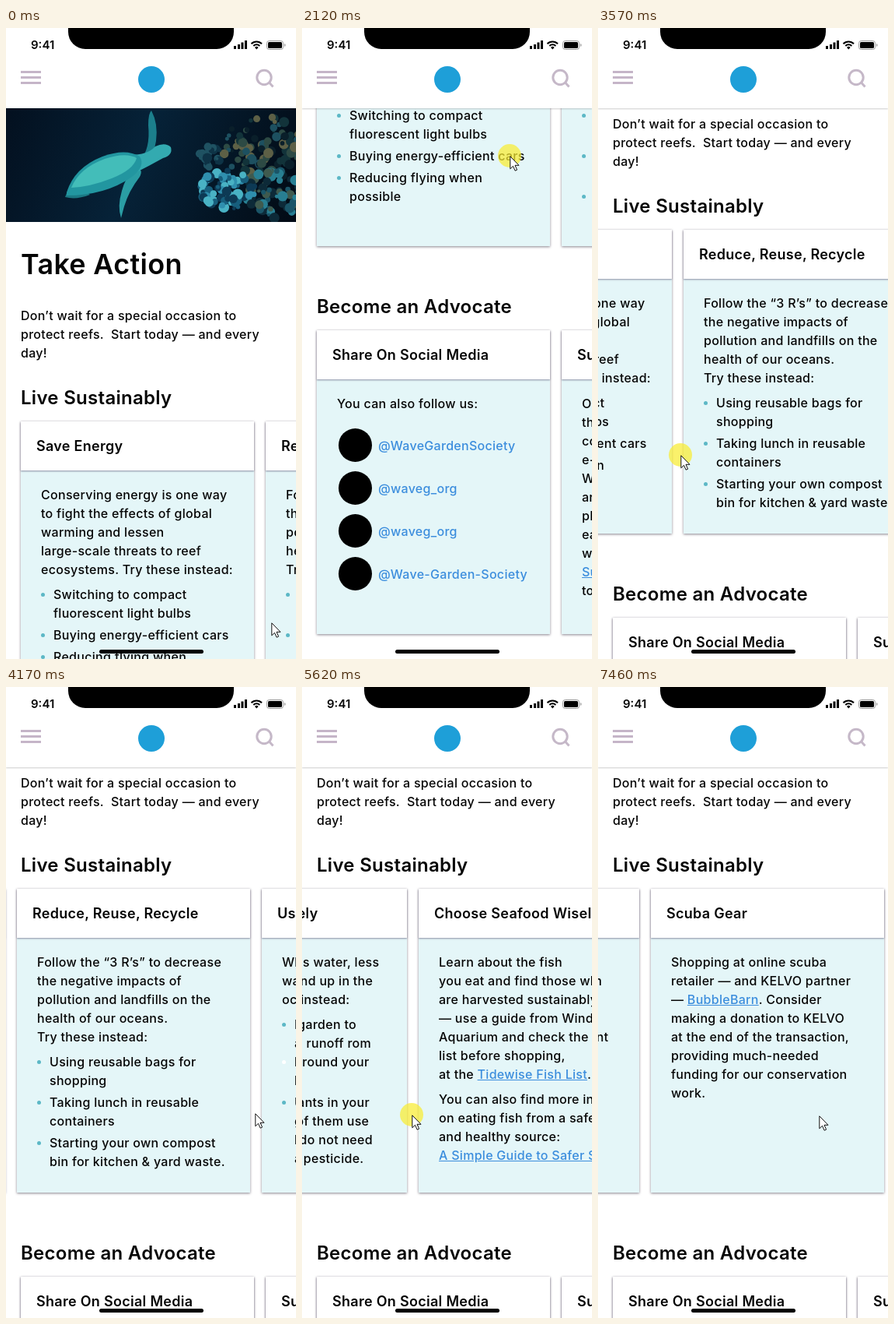
An HTML page with a canvas for the animation above (7.78 s loop, 373 px wide and 810 px high).

```html
<!DOCTYPE html>
<html lang="en">
<head>
<meta charset="utf-8">
<title>Take Action</title>
<style>
  html, body { margin: 0; width: 100%; height: 100%; overflow: hidden; background: #fff; }
  #stage {
    position: relative; width: 373px; height: 810px; overflow: hidden; background: #fff; color: #050505;
    font: 500 16px/24px Inter, "Open Sans", sans-serif; letter-spacing: .018em; white-space: pre;
  }
  #stage div, #stage svg, #stage canvas { position: absolute; }
  #page, #row1, #row2 { left: 0; top: 0; }
  h1, h2, h3, p, ul { position: absolute; margin: 0; padding: 0; left: 19px; }
  h1 { top: 281px; font: 600 36px/44px Inter, sans-serif; }
  h2 { font: 600 24px/30px Inter, sans-serif; }
  .card { width: 300px; height: 390px; background: #e4f6f8; box-shadow: 0 1px 3px rgba(40, 30, 50, .55); }
  h3 {
    left: 0; top: 0; width: 280px; height: 63px; padding-left: 20px; background: #fff;
    font: 600 18px/63px Inter, sans-serif; box-shadow: 0 1px 2px rgba(50, 40, 80, .5);
  }
  .copy { left: 26px; top: 82px; }
  .copy p, .copy ul { position: static; }
  .copy p + p, .copy ul { margin-top: 8px; }
  li { list-style: none; position: relative; padding-left: 16px; margin-bottom: 4px; }
  li::before, .faint::after {
    content: ""; position: absolute; left: 0; top: 10px; width: 5px; height: 5px;
    border-radius: 50%; background: #5cb8c6;
  }
  .faint::after { top: 58px; background: #fff; }
  u, .handle { color: #3b8ddd; }
  .disc { left: 28px; width: 43px; height: 43px; border-radius: 50%; background: #000; }
  .handle { left: 79px; }
  #bar { left: 0; top: 0; width: 373px; height: 103px; background: #fff; box-shadow: 0 1px 2px rgba(0, 0, 0, .2); }
  #notch { left: 80px; top: 0; width: 213px; height: 27px; background: #000; border-radius: 0 0 22px 22px; }
  #clock { left: 32px; top: 10px; font: 600 15px/24px Inter, sans-serif; letter-spacing: 0; }
  #home { left: 120px; top: 798px; width: 134px; height: 5px; border-radius: 3px; background: #000; }
  #press { left: -16px; top: -16px; width: 30px; height: 30px; border-radius: 50%; background: rgba(248, 236, 50, .72); }
  #cursor { left: 0; top: 0; }
</style>
</head>
<body>
<div id="stage">
  <div id="page">
    <canvas id="photo" width="373" height="146" style="left:0;top:103px"></canvas>
    <h1>Take Action</h1>
    <p style="top:357px">Don’t wait for a special occasion to
protect reefs.  Start today — and every
day!</p>
    <h2 style="top:460px">Live Sustainably</h2>
    <div id="row1"></div>
    <h2 style="top:958px">Become an Advocate</h2>
    <div id="row2"></div>
  </div>
  <div id="bar">
    <div id="notch"></div>
    <div id="clock">9:41</div>
    <svg width="373" height="103" style="left:0;top:0">
      <path d="M293 23h3v4h-3zM298 21h3v6h-3zM302.500 18.500h3v8.500h-3zM307 16h3v11h-3z"/>
      <g fill="none" stroke="#000" stroke-width="2">
        <path d="M315.500 20.200a9.500 9.500 0 0 1 13.500 0M318.300 23a5.500 5.500 0 0 1 8 0"/>
      </g>
      <path d="M322.300 27.500l-2.300-2.600a3.300 3.300 0 0 1 4.600 0z"/>
      <rect x="335.500" y="16.500" width="21" height="11" rx="3" fill="none" stroke="#999"/>
      <rect x="337" y="18" width="18" height="8" rx="1.600"/>
      <path d="M358 20v4q1.500-.7 1.500-2t-1.500-2z" fill="#999"/>
      <path d="M19 56.500h26M19 63.500h26M19 70.500h26" stroke="#c5b5c8" stroke-width="3"/>
      <circle cx="187" cy="66" r="17" fill="#1e9fd8"/>
      <g fill="none" stroke="#c5b8c8" stroke-width="3">
        <circle cx="332" cy="63.500" r="9.200"/><path d="M338.500 70l5 5.500"/>
      </g>
    </svg>
  </div>
  <div id="home"></div>
  <div id="cursor">
    <div id="press"></div>
    <svg width="14" height="21" style="left:-1px;top:-1px">
      <path d="M.8.800v16l3.700-3.500 2.600 5.900 2.500-1.100-2.600-5.800h5z" fill="#fff" stroke="#111"/>
    </svg>
  </div>
</div>
<script>
const $ = id => document.getElementById(id);
const para = s => `<p>${s}</p>`;
const list = (...items) => `<ul>${items.map(s => s.startsWith('*')
  ? `<li class="faint">${s.slice(1)}</li>` : `<li>${s}</li>`).join('')}</ul>`;

const tips = [
  ['Save Energy',
    para('Conserving energy is one way\nto fight the effects of global\nwarming and lessen\nlarge-scale threats to reef\necosystems. Try these instead:') +
    list('Switching to compact\nfluorescent light bulbs', 'Buying energy-efficient cars', 'Reducing flying when\npossible')],
  ['Reduce, Reuse, Recycle',
    para('Follow the “3 R’s” to decrease\nthe negative impacts of\npollution and landfills on the\nhealth of our oceans.\nTry these instead:') +
    list('Using reusable bags for\nshopping', 'Taking lunch in reusable\ncontainers', 'Starting your own compost\nbin for kitchen &amp; yard waste.')],
  ['User Water Wisely',
    para('When you use less water, less\nwastewater will end up in the\nocean. Try these instead:') +
    list('*Planting a rain garden to\nabsorb polluted runoff rom\nhard surfaces around your\nhome',
      'Using native plants in your\ngarden—most of them use\nless water and do not need\nany fertilizer or pesticide.')],
  ['Choose Seafood Wisely',
    para('Learn about the fish\nyou eat and find those which\nare harvested sustainably\n— use a guide from Windley Bay\nAquarium and check the catch\nlist before shopping,\nat the <u>Tidewise Fish List</u>.') +
    para('You can also find more info\non eating fish from a safe\nand healthy source:\n<u>A Simple Guide to Safer Seafood</u>')],
  ['Ocean Is Already A Gift',
    para('Don’t buy pearl jewelry or\nhousehold goods made from\nmarine life—that includes\nshells! Harvesting these\nspecies can cause significant\nhabitat destruction or\ndramatically reduce\npopulations.')],
  ['Scuba Gear',
    para('Shopping at online scuba\nretailer — and KELVO partner\n— <u>BubbleBarn</u>. Consider\nmaking a donation to KELVO\nat the end of the transaction,\nproviding much-needed\nfunding for our conservation\nwork.')]
];

const handles = ['@WaveGardenSociety', '@waveg_org', '@waveg_org', '@Wave-Garden-Society'];
const social = handles.map((name, i) =>
  `<div class="disc" style="top:${126 + i * 55}px"></div><div class="handle" style="top:${136 + i * 55}px">${name}</div>`).join('');
const advocate = [
  ['Share On Social Media', para('You can also follow us:'), social],
  ['Support Our Work', para('Our members keep\nthe reefs alive and\ncolonies safe. Our\ne-news shares it.\nWe send stories that\nare easy to read and\nplans for helping in\neach season, along\nwith local events.\n<u>Support us</u> today\nto learn more.')]
];

function fillRow(id, top, cards) {
  $(id).innerHTML = cards.map(([title, copy, extra = ''], i) =>
    `<div class="card" style="left:${19 + i * 315}px;top:${top}px"><h3>${title}</h3><div class="copy">${copy}</div>${extra}</div>`).join('');
}
fillRow('row1', 505, tips);
fillRow('row2', 1003, advocate);

function paintPhoto() {
  const c = $('photo').getContext('2d');
  const water = c.createLinearGradient(0, 0, 373, 146);
  water.addColorStop(0, '#03101f');
  water.addColorStop(.45, '#062238');
  water.addColorStop(1, '#020a14');
  c.fillStyle = water;
  c.fillRect(0, 0, 373, 146);

  let seed = 11;
  const rnd = () => (seed = seed * 16807 % 2147483647) / 2147483647;
  const cluster = (n, x, y, w, h, colors) => {
    for (let i = 0; i < n; i++) {
      const a = rnd() * 6.283, d = Math.sqrt(rnd());
      c.fillStyle = colors[i % colors.length];
      c.beginPath();
      c.arc(x + Math.cos(a) * d * w, y + Math.sin(a) * d * h, 2 + rnd() * 5, 0, 6.3);
      c.fill();
    }
  };
  cluster(90, 330, 52, 50, 42, ['#12333a', '#2d4a44', '#5d6046', '#1d5060', '#0a1f2a']);
  cluster(70, 345, 112, 42, 32, ['#0d2a38', '#1a5568', '#3f5a4e', '#287f92']);
  cluster(75, 285, 105, 36, 26, ['#175e7c', '#2f8fae', '#49b2c4', '#0d3a55']);
  cluster(25, 262, 62, 18, 16, ['#0e3346', '#1f5262']);

  const shape = (color, d) => { c.fillStyle = color; c.fill(new Path2D(d)); };
  shape('#1c7f8c', 'M172 68Q186 52 183 22Q183 6 187 3Q196 20 193 42Q190 62 180 74Z');
  shape('#2a9da4', 'M164 78Q178 76 172 88Q158 106 152 126L148 141Q143 126 149 106Q154 88 164 78Z');
  shape('#1b7984', 'M92 100Q78 104 76 114Q90 118 108 111Z');
  shape('#33aab0', 'M160 60Q182 60 192 49Q205 43 212 50Q215 60 202 64Q184 74 168 82Z');
  shape('#2296a0', 'M78 108Q88 76 124 62Q154 51 172 62Q180 74 162 88Q128 112 78 112Z');
  shape('#43bdb9', 'M84 102Q94 77 127 65Q154 56 168 64Q164 79 136 90Q108 101 84 102Z');
}
paintPhoto();

const ease = {
  l: u => u,
  i: u => u * u,
  o: u => 1 - (1 - u) ** 2,
  s: u => u * u * (3 - 2 * u)
};

// Each key: time, one or more values, optional ease into that key.
function at(keys, t) {
  const num = k => k.filter(v => typeof v === 'number').slice(1);
  const n = keys.findIndex(k => k[0] > t);
  if (n === 0) return num(keys[0]);
  if (n < 0) return num(keys[keys.length - 1]);
  const a = keys[n - 1], b = keys[n], last = b[b.length - 1];
  const u = (ease[last] || ease.s)((t - a[0]) / (b[0] - a[0]));
  const to = num(b);
  return num(a).map((v, i) => v + (to[i] - v) * u);
}

const pointer = [
  [70, 342, 764], [520, 330, 309], [830, 281, 640], [880, 281, 640],
  [1127, 273, 468, 'i'], [1430, 268, 157, 'o'], [2050, 268, 157], [2880, 287, 523],
  [2960, 288, 533, 'l'], [3250, 325, 549], [3330, 325, 549], [3650, 70, 549],
  [3750, 65, 549], [4180, 321, 548], [4400, 332, 549], [4500, 332, 549],
  [4820, 175, 550, 'i'], [4863, 168, 550, 'l'], [5000, 158, 550, 'o'], [5160, 158, 550],
  [5400, 330, 550], [5750, 60, 550], [5990, 325, 550], [6040, 325, 550],
  [6270, 40, 549], [6303, 30, 549, 'l'], [6400, 22, 549, 'o'], [6760, 22, 549],
  [6930, 320, 550], [7180, 70, 551], [7460, 285, 551]
];
const scrollY = [
  [70, 0], [520, 455], [840, 560, 'o'], [880, 562], [1050, 623],
  [2050, 623], [2880, 256], [2960, 246, 'l']
];
const scrollX = [
  [3330, 0], [3650, 262], [4180, 320, 'o'], [4420, 335, 'o'], [4500, 335],
  [4820, 525, 'i'], [4863, 570, 'l'], [5020, 640, 'o'], [5400, 640],
  [5750, 890], [6000, 950, 'o'], [6040, 950], [6270, 1140, 'i'],
  [6303, 1179, 'l'], [6530, 1262, 'o'], [6930, 1262], [7180, 1505], [7400, 1526, 'o']
];
const presses = [[100, 520], [890, 1430], [1810, 2960], [3330, 3650], [4500, 4820], [5400, 5750], [6040, 6270], [6930, 7180]];

// The motion advances in visible ticks: start, end, number of ticks.
const runs = [
  [0, 0, 1], [70, 820, 10], [900, 1430, 7], [1810, 1890, 1], [2050, 2800, 10], [2880, 3650, 10],
  [3730, 4480, 10], [4550, 5020, 6], [5160, 5930, 10], [6000, 6530, 7], [6760, 7460, 9]
];
function tick(t) {
  const [start, end, n] = runs.filter(r => r[0] <= t).pop();
  if (end === start) return start;
  const step = (end - start) / n;
  return start + Math.min(n, Math.floor((t - start) / step + .15)) * step;
}

const LOOP = 7780;
const move = (id, x, y) => { $(id).style.transform = `translate(${Math.round(x)}px, ${Math.round(y)}px)`; };
const origin = performance.now();

function draw() {
  const t = tick((performance.now() - origin) % LOOP);
  const [x, y] = at(pointer, t);
  move('page', 0, -at(scrollY, t)[0]);
  move('row1', -at(scrollX, t)[0], 0);
  move('cursor', x, y);
  $('press').style.display = presses.some(([a, b]) => t >= a && t < b) ? '' : 'none';
  requestAnimationFrame(draw);
}
draw();
</script>
</body>
</html>
```
